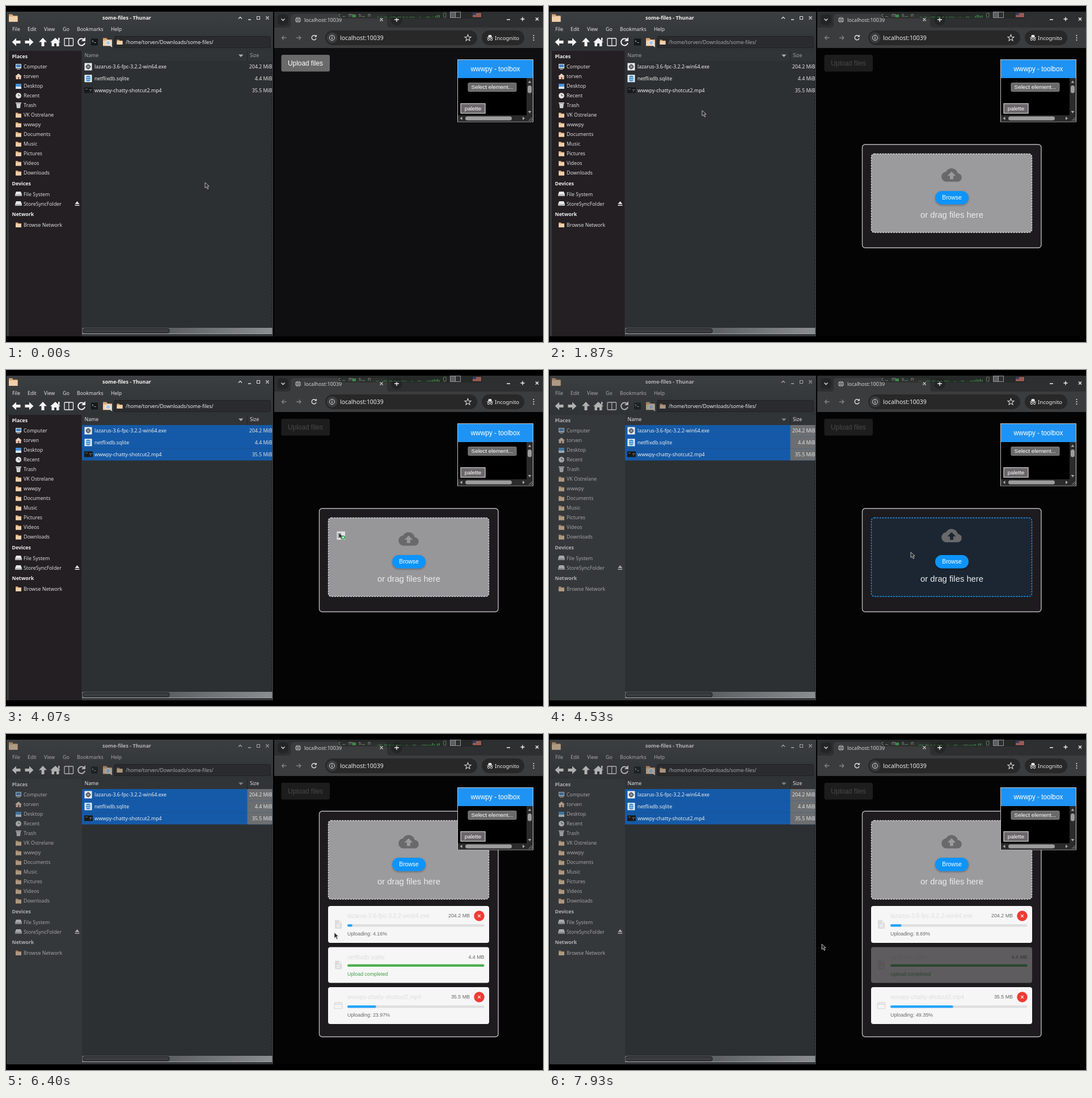
These frames come from a looping animation (947 px wide and 592 px high, 8000 ms). An HTML page:

```html
<!DOCTYPE html>
<html lang="en">
<head>
<meta charset="utf-8">
<title>File upload demo</title>
<style>
html, body { margin: 0; width: 100%; height: 100%; overflow: hidden; background: #000; }
svg { display: block; width: 947px; height: 592px; font-family: "Noto Sans", sans-serif; }
.web { font-family: "Liberation Sans", Arial, sans-serif; }
text { white-space: pre; }
</style>
</head>
<body>
<svg id="stage" viewBox="0 0 947 592">
  <defs>
    <linearGradient id="bar" x2="0" y2="1"><stop stop-color="#3c3f41"/><stop offset="1" stop-color="#303335"/></linearGradient>
    <linearGradient id="track"><stop offset=".45" stop-color="#5c5f62"/><stop offset="1" stop-color="#8b8e91"/></linearGradient>
    <filter id="soft" x="-20%" y="-20%" width="140%" height="160%"><feDropShadow dx="0" dy="1.5" stdDeviation="1.5" flood-opacity=".35"/></filter>
  </defs>
  <g id="manager"></g><g id="browser"></g><g id="page"></g><g id="toolbox" class="web"></g><g id="pointer"></g>
</svg>
<script>
const LOOP = 8000, FRAME = 1000 / 15;
const layer = id => document.getElementById(id);

const rect = (x, y, w, h, fill, more = '') =>
  `<rect x="${x}" y="${y}" width="${w}" height="${h}" fill="${fill}" ${more}/>`;
const box = (x, y, w, h, fill, r, stroke = 'none', more = '') =>
  rect(x, y, w, h, fill, `rx="${r}" stroke="${stroke}" ${more}`);
const path = (d, fill, more = '') => `<path d="${d}" fill="${fill}" ${more}/>`;
const line = (d, stroke, width = 1.2, more = '') =>
  path(d, 'none', `stroke="${stroke}" stroke-width="${width}" ${more}`);
const circle = (x, y, r, fill, more = '') => `<circle cx="${x}" cy="${y}" r="${r}" fill="${fill}" ${more}/>`;
const text = (x, y, str, size, fill, more = '') =>
  `<text x="${x}" y="${y}" font-size="${size}" fill="${fill}" ${more}>${str}</text>`;
const at = (x, y, body, more = '') => `<g transform="translate(${x} ${y})" ${more}>${body}</g>`;
const faded = (opacity, body) => `<g opacity="${opacity}">${body}</g>`;
const BOLD = 'font-weight="700"', MID = 'text-anchor="middle"', END = 'text-anchor="end"';

const clamp = v => Math.max(0, Math.min(1, v));
const smooth = v => v * v * (3 - 2 * v);

// Interpolates rows of [time, ...values].
function track(keys, t, ease = v => v) {
  let i = 1;
  while (i < keys.length - 1 && keys[i][0] < t) i++;
  const [a, b] = [keys[i - 1], keys[i]];
  const k = ease(clamp((t - a[0]) / (b[0] - a[0])));
  return a.slice(1).map((v, n) => v + (b[n + 1] - v) * k);
}

const moves = [
  [0, 351, 311], [530, 351, 311], [1250, 530, 98], [1470, 530, 100], [1867, 270, 184],
  [2300, 270, 184], [2900, 345, 228], [3400, 160, 102], [3500, 190, 122], [4067, 587, 287],
  [4533, 638, 321], [5130, 638, 321], [6400, 579, 350], [7933, 481, 370]
];
const files = [
  { name: 'lazarus-3.6-fpc-3.2.2-win64.exe', size: '204.2 Mi', kind: 'doc', loaded: [[4600, 0], [5000, .86], [6400, 4.16], [7933, 8.69]] },
  { name: 'netflixdb.sqlite', size: '4.4 Mi', kind: 'doc', loaded: [[4600, 0], [5000, 39.65], [5530, 100]] },
  { name: 'wwwpy-chatty-shotcut2.mp4', size: '35.5 Mi', kind: 'film', loaded: [[4600, 0], [5000, 4.23], [6400, 23.97], [7933, 49.35]] }
];
const OPENED = 1450, BAND = [2900, 3400], DRAG = [3520, 4500], BLURRED = 4400;
const DROPPED = 4600, DONE = 5530, FADE = 7380, BAR_LAG = 210;

/* ---- file manager ---- */

const folder = (x, y, scale = 1) => `<g transform="translate(${x} ${y}) scale(${scale})">` +
  path('M0 1h4l1 1.500h5v7H0z', '#d9a877') + rect(0, 3.5, 10, 6, '#f0d0ab') + '</g>';

const arrow = (x, angle) => `<g transform="translate(${x} 63.500) rotate(${angle})">` +
  path('M-7.500 0L0-7V-2.500H7.500V2.500H0V7z', '#f4f4f4') + '</g>';

const placeIcons = {
  Computer: y => rect(17, y - 5, 10, 8, '#d7dde3') + rect(18, y - 4, 8, 5, '#4a86c0') + rect(19, y + 4, 6, 1, '#ccc'),
  Desktop: y => rect(17, y - 4, 10, 9, '#d5e6f5') + rect(17, y - 4, 10, 5, '#4b93d8'),
  Recent: y => circle(22, y, 5, '#e4e4e4') + line(`M22 ${y - 3}v3h3`, '#555', 1),
  Trash: y => path(`M18 ${y - 3}h8l-1 8h-6z`, '#cfcfcf') + rect(17, y - 5, 10, 1.5, '#eee'),
  torven: y => path(`M16 ${y}l6-5 6 5h-1.500v5h-9v-5z`, '#ead2bf') + rect(21, y + 1, 2.5, 4, '#a6553a')
};
const drive = y => path(`M18 ${y - 4}h8l2 5v3H16v-3z`, '#e6e6e6') + rect(16, y + 1, 12, 3, '#b5b5b5');
const places = ['Computer', 'torven', 'Desktop', 'Recent', 'Trash', 'VK Ostrelane', 'wwwpy', 'Documents',
  'Music', 'Pictures', 'Videos', 'Downloads'];

const fileIcons = [
  y => rect(138.5, y - 6.5, 13, 13, '#eceef0') + circle(145, y, 3, 'none', 'stroke="#55585c" stroke-width="2"') +
    line(`M145 ${y - 5}v10M140 ${y}h10`, '#55585c', .9),
  y => rect(138.5, y - 6.5, 13, 13, '#e6eef6') + box(141, y - 5, 8, 10, '#4a90d0', 3) +
    line(`M141 ${y - 1.5}h8M141 ${y + 2}h8`, '#dcebf8', .9),
  y => rect(138, y - 5, 15, 10, '#17191b') + line(`M140 ${y - 2}h4M147 ${y - 1}h5M149 ${y - 1}v4`, '#8a8d90', .8)
];

const managerBase = rect(1, 10, 470, 572, '#35383a') + rect(1, 10, 470, 69, 'url(#bar)') +
  rect(134, 79, 335.5, 488, '#2d3032') + rect(134, 79, 335.5, 18, '#313437') + rect(425, 80, 1, 17, '#212325') +
  line('M468.500 98V566', '#1d1f20', 1, 'stroke-dasharray="3 3"') +
  rect(134, 567, 335.5, 11, 'url(#track)') + rect(134, 577, 335.5, 1, '#a2a4a6') +
  box(136, 568.5, 152, 7.5, '#3a3d40', 3, '#17191a') + box(191, 53.5, 275, 20, '#292b2e', 2, '#1e2022');

const managerTools = folder(5, 13, 1.55) +
  line('M410 22.500l3-3 3 3M427 24h5M458.500 18.500l5 5m0-5l-5 5', '#dedede', 1.3) +
  box(442.5, 18.5, 5, 5, 'none', 0, '#dedede') +
  ['File', 'Edit', 'View', 'Go', 'Bookmarks', 'Help'].map((s, i) =>
    text([11, 38, 67, 100, 125, 185][i], 44, s, 8.8, '#e2e2e2')).join('') +
  arrow(18, 0) + arrow(41, 180) + arrow(65, 90) +
  path('M78 64l9-8 9 8h-2.500v7h-4.500v-5h-4v5h-4.500v-7z', '#f4f4f4') + rect(92, 56, 2.5, 5, '#f4f4f4') +
  box(103, 57, 15.5, 13, 'none', 1, '#f4f4f4', 'stroke-width="1.300"') + line('M110.800 57v13', '#f4f4f4') +
  line('M138 60a6 6 0 1 0 1 5', '#f4f4f4', 2) + path('M140 55v7h-7z', '#f4f4f4') +
  rect(150, 57.5, 12, 12, '#15181a') + line('M152 60.500l2 1.500-2 1.500M155.500 64.500h3', '#c6c6c6', .9) +
  folder(171, 55, 1.6) + circle(180, 65, 4, '#a9c9e4', 'stroke="#eee" stroke-width="1.300"') + line('M183 68l4 4', '#eee', 1.6) +
  folder(195.5, 58.5) + path('M410 85.500h8.500l-4.250 4.500z', '#aeb0b2');

const sidebar = places.map((s, i) => {
    const y = 107 + 17 * i;
    return (placeIcons[s] ? placeIcons[s](y) : folder(17, y - 5)) + text(31, y + 3, s, 8.8, '#dcdcdc');
  }).join('') +
  [['Places', 91.5], ['Devices', 316], ['Network', 370]].map(([s, y]) => text(10.5, y, s, 8.8, '#f0f0f0', BOLD)).join('') +
  drive(331) + text(31, 334.5, 'File System', 8.8, '#dcdcdc') +
  drive(348) + text(31, 351.5, 'StoreSyncFolder', 8.8, '#dcdcdc') +
  path('M121.500 349l4-5 4 5zM121.500 350.500h8v1.500h-8z', '#e6e6e6') +
  folder(17, 380.5) + text(31, 388.5, 'Browse Network', 8.8, '#dcdcdc');

function drawManager(t, [px, py]) {
  const pathLit = t < 1330 || (t >= BAND[0] && t < 4570);
  const blurred = t >= BLURRED, dim = blurred ? .65 : 1;
  const header = t < BAND[0] ? '#a3a5a7' : '#e4e4e4';
  const banding = t >= BAND[0] && t < BAND[1];
  let out = managerBase + rect(5, 79, 128.5, 503, blurred ? '#35383a' : '#231f22') +
    faded(dim, managerTools + sidebar + text(213, 24, 'some-files - Thunar', 9, '#f2f2f2', `${MID} ${BOLD}`)) +
    text(211, 66.5, '/home/torven/Downloads/some-files/', 8.75, pathLit ? '#ededed' : '#a6a8aa') +
    text(138.5, 90, 'Name', 8.8, header) + text(430, 90, 'Size', 8.8, header);
  files.forEach((f, i) => {
    const y = 107 + 20.7 * i, top = 97 + 20.7 * i;
    if (t >= BAND[1] || (banding && py < top + 20.7)) {
      out += rect(134, top, 335.5, 20.9, '#155aa8');
      if (blurred) out += rect(425.5, top, 44, 20.9, '#6c6e70');
    }
    out += fileIcons[i](y) + text(156, y + 3.2, f.name, 8.8, '#ececec') + text(469.5, y + 3.2, f.size + 'B', 8.8, '#e2e2e2', END);
  });
  if (banding) out += rect(px, py, 345 - px, 228 - py, '#2470c0', 'fill-opacity=".25" stroke="#2f7fd2"');
  return out;
}

/* ---- browser ---- */

const browserBase = rect(473, 10, 474, 30, '#2d2f30') + rect(473, 38, 474, 36, '#3b3c3d') +
  path('M496 38q6 0 6-6V20q0-6 6-6h158q6 0 6 6v12q0 6 6 6z', '#3b3c3d') +
  box(479, 14.5, 19, 19, '#242526', 6) + circle(689, 24, 10, '#242526') +
  line('M485.500 22.500l3 3 3-3M659.500 21.500l5 5m0-5l-5 5', '#e0e0e0', 1.3) +
  circle(515, 24.5, 5, '#a9abad') + line('M510 24.500h10M515 19.500q-4 5 0 10q4-5 0-10', '#3b3c3d', .9) +
  text(526, 27.5, 'localhost:10039', 9, '#d5d5d5') +
  line('M685 24h8M689 20v8M883 24h6M907.500 23h7M911 19.500v7M934 20.500l5 5m0-5l-5 5', '#f0f0f0', 1.4) +
  line('M494.500 56h-8m3.500-3.500l-3.500 3.500 3.500 3.500M512 56h8m-3.500-3.500l3.500 3.500-3.500 3.500', '#818385', 1.3) +
  line('M546.500 53.500a4 4 0 1 0 .5 3.500', '#dedede', 1.4) + path('M548 50.500v4h-4z', '#dedede') +
  box(563, 43, 268, 26, '#282829', 13) + circle(575, 56, 9.5, '#3b3c3d') +
  circle(575, 56, 4.5, 'none', 'stroke="#dedede"') + line('M575 55v3.500M575 53v1', '#dedede') +
  text(589, 60, 'localhost:10039', 10.45, '#ececec') +
  line('M814.500 50.500l1.500 3.800 4 .2-3.100 2.600 1 4-3.400-2.200-3.400 2.200 1-4-3.100-2.600 4-.2z', '#dedede', 1.1) +
  box(839, 43, 75, 26, '#282829', 13) +
  path('M848 55.500h11v1h-11zM850 55l1.200-4h4.600l1.200 4z', '#e4e4e4') +
  circle(851, 59, 1.7, 'none', 'stroke="#e4e4e4"') + circle(856, 59, 1.7, 'none', 'stroke="#e4e4e4"') +
  text(862, 59.5, 'Incognito', 9.6, '#ececec') +
  [52, 56, 60].map(y => circle(930.5, y, 1.1, '#e4e4e4')).join('');

// Translucent panel applet with a load graph that shifts slowly.
function drawApplet(t) {
  const noise = n => { const v = Math.sin(n * 12.9898) * 43758.5453; return v - Math.floor(v); };
  const shift = Math.floor(t / 800);
  let out = rect(585, 10, 255, 12, '#1c211d', 'opacity=".55"');
  [...'cmsn'].forEach((c, i) => out += text([586, 604, 622, 638][i], 19, c, 8.5, '#b3b8b5'));
  out += line('M593 18.500h5M627 18.500h6', '#55a060') + rect(611, 15, 6, 5, '#3f9f4a');
  for (let i = 0; i < 38; i++) {
    const v = noise(i + shift), h = i > 32 ? 1 + v * 4 : .6 + v * 1.6;
    out += rect(652 + i * 3, 20.5 - h, 2, h, v > .45 ? '#3c8b46' : '#2c4a31');
  }
  out += box(771.5, 12.5, 4.5, 7.5, 'none', 1, '#7f9a80') +
    box(783.5, 10.5, 18, 10, '#2e3032', 0, '#b4b6b8') + rect(784, 11, 8.5, 9, '#6c6e70') + line('M792.500 10v11', '#b4b6b8') +
    rect(823, 12, 15, 8, '#b34a45') + line('M823 14.500h15M823 17.500h15', '#c9a9a5', 1) + rect(823, 12, 6, 4, '#3a4470');
  return faded(.75, out);
}

/* ---- page ---- */

const cloud = 'M19.350 10.040C18.670 6.590 15.640 4 12 4 9.110 4 6.600 5.640 5.350 8.040 2.340 8.360 0 10.910 0 14c0 3.310 2.690 6 6 6h13c2.760 0 5-2.240 5-5 0-2.640-2.050-4.780-4.650-4.960zM14 13v4h-4v-4H7l5-5 5 5z';
const kinds = {
  doc: path('M-6-7.500h7.500l4.500 4.500V6q0 1.500-1.500 1.500h-9q-1.500 0-1.500-1.500z', '#dcdcdc') +
    line('M-3 1h6M-3 4h6', '#f6f6f6', 1.3) + path('M1-6v4h4z', '#f6f6f6'),
  film: box(-6.7, -5.2, 13.4, 10.6, 'none', 1, '#dcdcdc', 'stroke-width="1.400"') +
    line('M-5-5l1.500 3M-1-5l1.500 3M3-5l1.500 3M-6.500-2h13', '#dcdcdc', 1.4)
};

function drawZone(y, hot) {
  const mix = (a, b) => `rgb(${a.map((v, i) => Math.round(v + (b[i] - v) * hot))})`;
  return box(568.5, y + .5, 283, 138.5, mix([155, 154, 156], [27, 38, 50]), 5, mix([216, 216, 216], [33, 150, 243]),
      'stroke-width="1.400" stroke-dasharray="3 1.700"') +
    `<g transform="translate(692.200 ${y + 20 - 6 * hot}) scale(1.480)">${path(cloud, '#69686a')}</g>` +
    box(681, y + 66, 59, 23.5, '#1094fb', 11.75, 'none', 'filter="url(#soft)"') +
    text(710.5, y + 81.3, 'Browse', 10.36, '#fff', MID) +
    text(710.5, y + 113, 'or drag files here', 14.8, '#ececec', MID);
}

function drawCard(file, y, t) {
  const [value] = track(file.loaded, t);
  const width = 2.415 * track(file.loaded, t - BAR_LAG)[0];
  const done = value >= 100, up = done ? 2 : 0, color = done ? '#4caf50' : '#21a3fb';
  const opacity = done ? 1 - clamp((t - FADE) / 790) : 1;
  return at(0, y,
    box(568, 0, 284, done ? 63 : 65, '#f6f6f6', 4) +
    at(586, 32.5 - up / 2, kinds[file.kind]) +
    text(602, 21, file.name, 10.36, '#dedede') +
    text(done ? 843.5 : 818, 20.3, file.size.replace('Mi', 'MB'), 8.88, '#666', END) +
    (done ? '' : circle(834.5, 17.5, 9.2, '#f03a34') + line('M832.200 15.200l4.600 4.600m0-4.600l-4.600 4.600', '#fff', 1.1)) +
    box(602, 32.3 - up, 241.5, 4.2, '#dedede', 2.1) +
    box(602, 32.3 - up, width, 4.2, color, Math.min(2.1, width / 2)) +
    text(602, 52 - up, done ? 'Upload completed' : `Uploading: ${value.toFixed(2)}%`, 8.88, done ? '#43a047' : '#666'),
    `opacity="${opacity}"`);
}

function drawPage(t) {
  let out = rect(473, 74, 474, 508, '#0f0e10') + box(485.5, 86, 85.5, 29.5, '#6b6a6b', 3) +
    text(528, 105, 'Upload files', 11.85, '#fff', MID);
  if (t < OPENED) return out;
  out += rect(473, 74, 474, 508, '#000', 'opacity=".72"');
  const uploading = t >= DROPPED, done = t >= DONE;
  const top = uploading ? (done ? 136 : 135) : 244;
  const height = uploading ? (done ? 397.5 : 399.5) : 182;
  out += box(552.5, top, 315.5, height, '#1e1b1f', 5, '#b9b8ba', 'stroke-width="1.400"');
  out += drawZone(top + 16, uploading ? 0 : clamp((t - 4060) / 220));
  if (uploading) files.forEach((f, i) =>
    out += drawCard(f, top + 167 + 72.5 * i - (done && i === 2 ? 2 : 0), t));
  return out;
}

const toolbox = rect(796.5, 94.5, 133, 109.5, '#000', 'stroke="#c4c4c4"') + rect(797, 95, 132, 32, '#1f93f3') +
  text(863, 115, 'wwwpy - toolbox', 11.85, '#fff', MID) +
  box(815, 135.5, 85, 15, '#6b6a6b', 1.5, '#858485') + text(857.3, 146.3, 'Select element...', 9.87, '#fff', MID) +
  rect(802, 172, 43, 17, '#6a6669', 'stroke="#d0d0d0" stroke-width="1.300"') + text(823.5, 184, 'palette', 9.87, '#fff', MID) +
  rect(918, 127, 11, 76, '#2b2b2c') + rect(797, 192.5, 132, 11, '#2b2b2c') +
  box(920, 140, 7, 13.5, '#9d9d9e', 3.5) + box(810, 194.5, 82, 7, '#9d9d9e', 3.5) +
  path('M920.500 135.500h6l-3-4zM920.500 185h6l-3 4zM804.500 195v6l-4-3zM911 195v6l4-3z', '#a9a9aa') +
  line('M922 202.500l6-6M925.500 202.500l3-3', '#aaa', 1);

/* ---- pointer ---- */

const arrowShape = path('M0 0V9.500l2.300-2 2 4 1.700-.8-2-3.900 3.200-.3z', '#26282a', 'stroke="#c8c8c8" stroke-width=".9"');
function drawPointer(t, [x, y]) {
  if (t >= DRAG[0] && t < DRAG[1])
    return at(x, y, rect(-3.5, -2.5, 14.5, 14.5, '#e3e3e3') + rect(-2, 0, 6, 9, '#9fa3a6') + arrowShape +
      circle(7.5, 8, 3.6, '#36a852') + line('M5.500 8h4M7.500 6v4', '#fff', 1.1));
  if (t >= DROPPED && t < 5300)
    return at(x, y, line('M-2-5.500q2 0 2 1.500v8q0 1.500-2 1.500M2-5.500q-2 0-2 1.500M2 5.500q-2 0-2-1.500', '#444', 1));
  return at(x, y, arrowShape);
}

layer('browser').innerHTML = browserBase + '<g id="applet"></g>';
layer('page').setAttribute('class', 'web');
layer('toolbox').innerHTML = toolbox;

let last = -1;
function tick() {
  const frame = Math.floor((performance.now() % LOOP + 4) / FRAME) % (LOOP / FRAME);
  if (frame !== last) {
    last = frame;
    const t = frame * FRAME, spot = track(moves, t, smooth);
    layer('manager').innerHTML = drawManager(t, spot);
    layer('applet').innerHTML = drawApplet(t);
    layer('page').innerHTML = drawPage(t);
    layer('pointer').innerHTML = drawPointer(t, spot);
  }
  requestAnimationFrame(tick);
}
tick();
</script>
</body>
</html>
```
